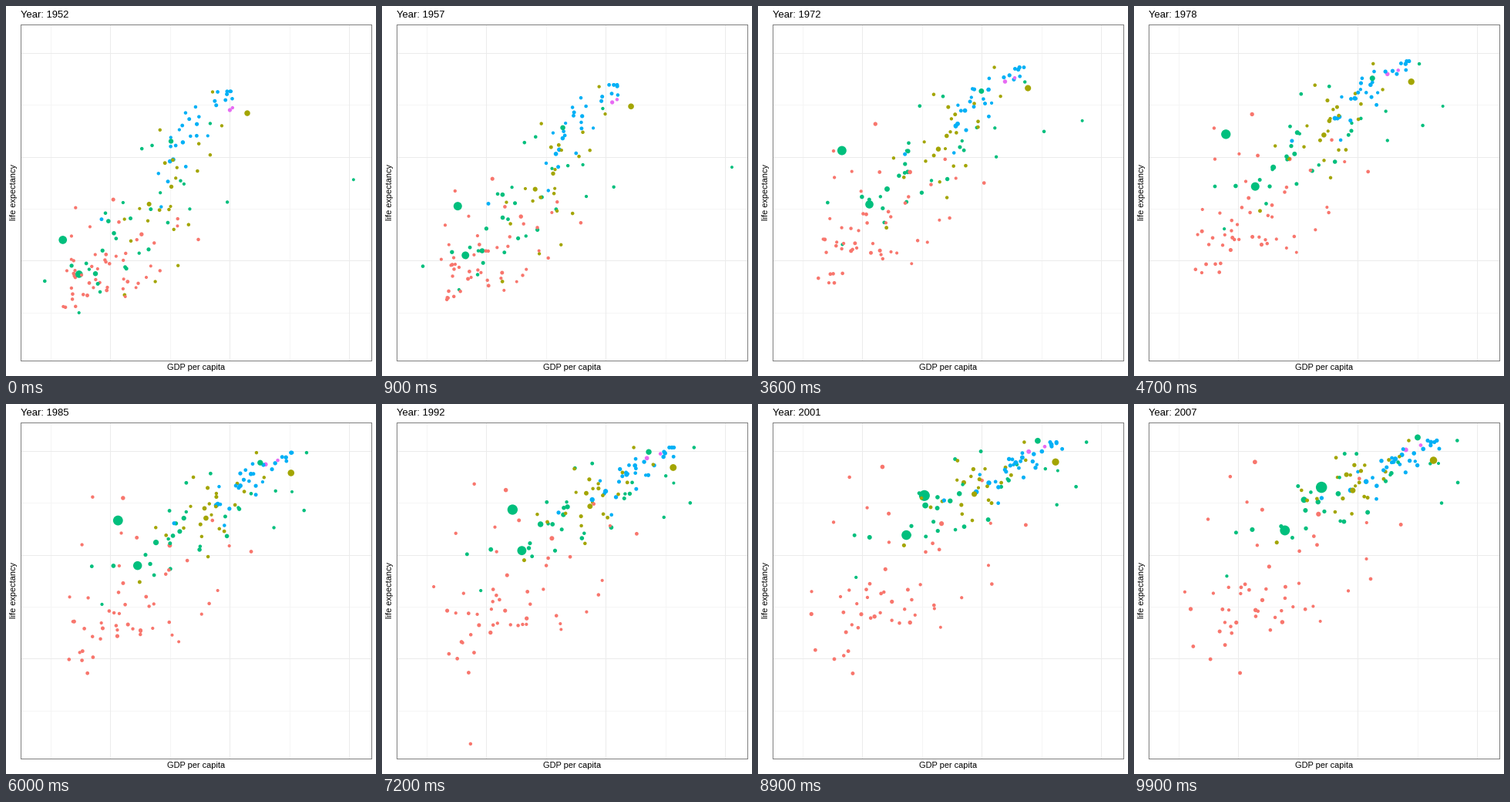
These frames come from a looping animation (480x480 px, 10 s). A matplotlib script:

```python
import numpy as np
import matplotlib.pyplot as plt
from matplotlib.animation import FuncAnimation

plt.rcParams["font.family"] = "Liberation Sans"
rng = np.random.default_rng(21)

SIZE, DPI = 480, 72
FRAMES, STEP = 100, 9                  # nine frames between two surveys
SURVEYS = np.arange(1952, 2008, 5)
GROWTH = 2.4                           # population, first to last survey

# Rise from 0 to 1 over the surveys, quick at first and flatter later
EASE = 1 - (1 - np.linspace(0, 1, len(SURVEYS))) ** 1.5

COLORS = dict(africa="#F8766D", americas="#A3A500", asia="#00BF7D",
              europe="#00B0F6", oceania="#E76BF3")

# Region: count, median millions, correlation, skew, then first and last
# (mean log10 gdp, its spread, mean life expectancy, its spread)
CLOUDS = dict(
    africa=(51, 3, 0.35, 0.2, (2.97, 0.28, 39, 5), (3.25, 0.41, 55, 9.5)),
    americas=(23, 4, 0.65, 0, (3.5, 0.23, 53, 9), (3.93, 0.26, 73.5, 4.2)),
    asia=(28, 8, 0.7, 0, (3.2, 0.35, 46.5, 8.5), (3.85, 0.5, 71, 6)),
    europe=(30, 8, 0.8, -0.2, (3.68, 0.25, 64.5, 6), (4.33, 0.25, 77.6, 3)),
    oceania=(2, 5, 1, 0, (4.01, 0.01, 69.2, 0.2), (4.47, 0.07, 80.7, 0.5)),
)

# Large countries that ease from one (gdp, life) to another
GIANTS = [
    ("asia", 400, (547, 37.4), (2452, 64.7)),
    ("americas", 157, (13990, 68.4), (42952, 78.2)),
    ("asia", 80, (3217, 63), (31656, 82.6)),
    ("asia", 82, (750, 37.5), (3541, 70.6)),
    ("americas", 57, (2109, 50.9), (9066, 72.4)),
]

# Countries with sudden turns: {year: (gdp, life)}
TURNS = [
    ("asia", 556, {1952: (400, 44), 1957: (576, 50.5), 1962: (488, 44.5),
                   1967: (613, 58.4), 1977: (741, 64), 1992: (1656, 68.7),
                   2007: (4959, 73)}),
    ("asia", 0.2, {1952: (108382, 55.6), 1957: (113523, 58),
                   1967: (80895, 64.6), 1977: (59265, 69.3),
                   1982: (31354, 71.3), 2007: (47307, 77.6)}),
    ("africa", 2.5, {1952: (493, 40), 1987: (848, 44), 1992: (737, 23.6),
                     1997: (590, 36.1), 2007: (863, 46.2)}),
]


def scores(n, skew):
    """Standard scores that drift a little from survey to survey."""
    z = rng.normal(size=n)
    z = np.clip((z - z.mean()) / z.std(), -2.1, 2.1)
    z = (z + skew * (z ** 2 - 1)) / np.sqrt(1 + 2 * skew ** 2)
    drift = np.cumsum(rng.normal(0, 0.1, (len(SURVEYS), n)), axis=0)
    return z + drift - drift.mean(axis=0)


def eased(first, last):
    return (first + (last - first) * EASE)[:, None]


def cloud(n, median, corr, skew, first, last):
    mx, sx, my, sy = (eased(a, b) for a, b in zip(first, last))
    zx, zy = scores(n, skew), scores(n, skew)
    x = mx + sx * zx
    y = my + sy * (corr * zx + np.sqrt(1 - corr ** 2) * zy)
    pop = np.minimum(median * np.exp(rng.normal(0, 1, n)), 50)
    return x, np.minimum(y, eased(72.6, 82)), pop


def giant(pop, first, last):
    x = eased(np.log10(first[0]), np.log10(last[0]))
    return x, eased(first[1], last[1]), [pop]


def turning(pop, path):
    gdp, life = np.array(list(path.values())).T
    x, y = (np.interp(SURVEYS, list(path), v)[:, None]
            for v in (np.log10(gdp), life))
    return x, y, [pop]


def build():
    parts = [(g, cloud(*p)) for g, p in CLOUDS.items()]
    parts += [(g, giant(*p)) for g, *p in GIANTS]
    parts += [(g, turning(*p)) for g, *p in TURNS]
    x, y, pop = (np.concatenate([p[i] for _, p in parts], axis=-1)
                 for i in range(3))
    colors = np.array([COLORS[g] for g, p in parts for _ in p[2]])
    order = rng.permutation(len(pop))
    return x[:, order], y[:, order], pop[order], colors[order]


X, Y, POP, DOT_COLORS = build()


def between(table, pos):
    k = min(int(pos), len(SURVEYS) - 2)
    return table[k] + (table[k + 1] - table[k]) * (pos - k)


def areas(share):
    pop = POP * GROWTH ** share
    return (3.8 + 10.65 * np.sqrt(pop / 1319)) ** 2


# Panel edges in pixels, and the scales that run through it
LEFT, RIGHT, TOP, BOTTOM = 19, 474, 24, 460
DECADE, YEAR = 155, 6.7375
X_1000, Y_80 = 135.4, 60.9

fig = plt.figure(figsize=(SIZE / DPI, SIZE / DPI), dpi=DPI, facecolor="white")
ax = fig.add_axes([LEFT / SIZE, 1 - BOTTOM / SIZE,
                   (RIGHT - LEFT) / SIZE, (BOTTOM - TOP) / SIZE])
ax.set_xlim(3 + (LEFT - X_1000) / DECADE, 3 + (RIGHT - X_1000) / DECADE)
ax.set_ylim(80 - (BOTTOM - Y_80) / YEAR, 80 - (TOP - Y_80) / YEAR)
ax.set_xticks([])
ax.set_yticks([])
for spine in ax.spines.values():
    spine.set(color="#7F7F7F", linewidth=1)

for shade, gdp, life in (("#F5F5F5", (2.5, 3.5, 4.5), (30, 50, 70)),
                         ("#EBEBEB", (3, 4, 5), (40, 60, 80))):
    for v in gdp:
        ax.axvline(v, color=shade, lw=1, zorder=0.5)
    for v in life:
        ax.axhline(v, color=shade, lw=1, zorder=0.5)

dots = ax.scatter(X[0], Y[0], s=areas(0), c=DOT_COLORS, linewidths=0, zorder=2)


def label(x, y, text, size, **kw):
    return fig.text(x / SIZE, 1 - y / SIZE, text, fontsize=size, color="black",
                    va="baseline", rotation_mode="anchor", **kw)


title = label(19, 15, "", 13)
label(247, 472, "GDP per capita", 11, ha="center")
label(13, 241.5, "life expectancy", 11, ha="center", rotation=90)


def draw(frame):
    pos = frame / STEP
    dots.set_offsets(np.column_stack([between(X, pos), between(Y, pos)]))
    dots.set_sizes(areas(frame / (FRAMES - 1)))
    title.set_text(f"Year: {round(1952 + 5 * pos)}")
    return dots, title


anim = FuncAnimation(fig, draw, frames=FRAMES, interval=100,
                     repeat=True, repeat_delay=0, blit=False)
plt.show()
```
